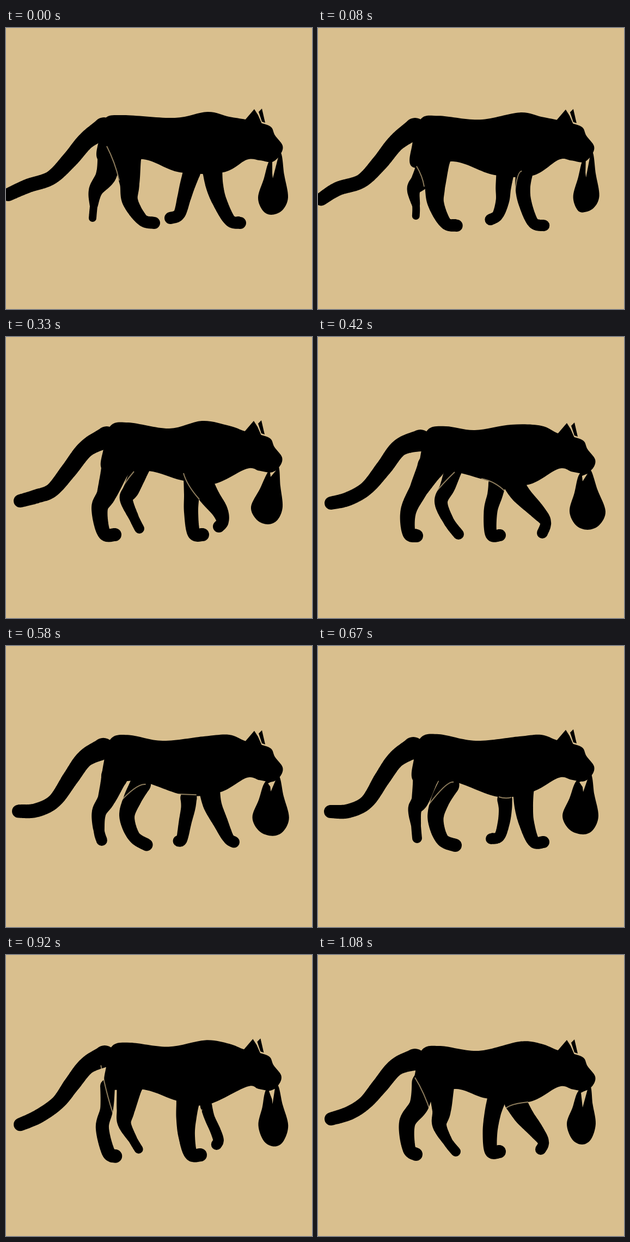
An HTML page with a canvas for the animation above (1.16 s loop, 562 by 516 pixels).

```html
<!DOCTYPE html>
<html>
<head>
<meta charset="utf-8">
<style>
  html, body { margin: 0; overflow: hidden; background: #d9bf8e; }
  canvas { display: block; }
</style>
</head>
<body>
<canvas id="stage" width="562" height="516"></canvas>
<script>
const LOOP = 1160;
const STEPS = [0, 80, 170, 250, 330, 420, 500, 580, 670, 750, 830, 920, 1000, 1080];
const KEYS = [0, 170, 330, 420, 670, 830, 1080];
const INK = '#000', SAND = '#d9bf8e', SEAM = 'rgba(217,191,142,.65)';

// One row per key pose.
const parse = text => text.trim().split('\n').map(row => row.match(/-?\d+/g).map(Number));

// Legs: hip, knee, hock, ankle, toe, then thigh and paw radius.
const nearHind = parse(`
222,235 227,285 228,318 250,352 272,358 18 11
208,245 200,295 200,325 211,362 229,368 19 11
202,238 185,288 172,315 180,360 200,363 18 12
208,238 185,280 166,320 167,360 181,365 17 12
198,240 188,282 178,300 180,330 182,353 16 9
224,240 213,285 211,308 226,338 234,354 16 8
226,235 227,285 223,312 238,342 253,361 17 9`);

const farHind = parse(`
190,232 184,270 165,298 161,328 159,349 19 7
228,236 200,285 191,296 205,330 210,345 16 8
247,240 230,280 221,298 235,332 245,352 15 9
248,245 238,275 226,303 240,338 258,362 14 10
240,255 224,285 216,318 228,355 252,366 17 12
190,245 189,285 187,320 201,362 214,369 10 12
193,235 186,275 164,308 167,355 180,366 18 12`);

const nearFore = parse(`
341,265 333,290 327,312 318,342 302,349 14 11
345,270 349,295 354,325 349,347 344,356 15 10
355,258 372,290 392,318 398,338 391,348 19 11
357,263 372,288 403,320 418,340 412,360 18 10
377,265 378,295 383,325 396,359 414,360 17 11
343,268 342,300 345,330 355,365 371,368 20 12
328,265 321,290 316,325 318,360 333,361 15 12`);

const farFore = parse(`
379,262 383,290 392,318 411,353 430,358 16 11
372,270 365,295 366,325 375,360 391,367 12 10
342,260 341,290 340,322 345,360 361,363 14 12
329,270 325,290 317,320 318,362 334,364 14 11
343,282 344,300 341,325 333,350 318,354 12 10
368,280 369,300 372,322 373,340 371,345 6 10
363,270 378,295 400,322 414,343 409,357 18 10`);

const tail = parse(`
4,306 40,290 83,275 118,241 147,207 180,184
13,320 38,300 78,286 108,254 140,213 177,187
26,301 55,293 85,281 116,244 147,205 185,184
24,305 56,297 90,277 121,240 150,203 188,190
23,304 56,303 90,286 118,243 143,208 175,187
25,315 58,300 98,273 124,237 150,203 182,183
24,301 58,290 87,271 113,241 143,206 178,192`);
const TAIL_RADII = [12, 13, 13, 15, 16, 20];

// Rump, croup, dip, shoulder, chest, belly, flank.
const torso = parse(`
171,203 215,160 310,165 370,154 399,265 319,265 252,241
177,225 230,163 283,173 370,157 385,278 325,273 250,250
179,205 225,157 300,168 360,154 381,270 322,263 262,246
190,207 235,164 288,171 355,161 387,271 325,267 252,248
176,208 222,162 290,174 370,166 393,268 331,277 245,248
185,198 228,158 300,165 365,156 366,276 320,271 256,248
179,213 225,167 295,176 370,159 386,270 308,263 254,246`);

const headShift = parse(`
0,0
-2,3
-1,5
1,9
-1,5
-4,4
1,7`);
const FACE = [[440, 168], [470, 175], [487, 182], [494, 197], [508, 216], [504, 232]];
const JAW = [[489, 246], [466, 243]];
const NEAR_EAR = [[438, 170], [456, 149], [463, 160], [470, 176]];
const FAR_EAR = [[464, 154], [470, 148], [476, 174], [470, 172]];

// Strap ends, slit tip, lowest point, then left, right and widest height.
const bag = parse(`
484,243 504,228 490,276 487,343 463 518 311
488,241 502,228 493,272 483,336 471 513 306
483,245 500,236 486,257 481,344 450 508 312
480,252 499,242 486,265 495,354 462 528 320
475,247 500,233 487,268 487,346 449 515 312
478,245 498,235 491,270 496,352 465 522 314
478,250 499,238 486,280 485,348 457 510 310`);

// Light seams: start, control, end.
const hindSeam = parse(`
185,217 200,246 208,280
182,289 186,297 184,304
235,247 215,270 206,292
251,248 230,268 212,290
249,250 238,246 202,293
182,198 188,265 201,315
178,225 195,252 208,292`);

const foreSeam = parse(`
361,266 361,266 361,266
378,262 364,262 366,332
326,250 332,272 355,298
300,260 325,265 343,283
332,277 344,281 355,278
367,278 360,310 362,338
339,290 342,274 386,270`);

const ctx = document.getElementById('stage').getContext('2d');
const count = KEYS.length;
const keyTime = i => KEYS[(i + count) % count] + LOOP * Math.floor(i / count);
const mix = (a, b, u) => a + (b - a) * u;
const shift = (points, dx, dy) => points.map(([x, y]) => [x + dx, y + dy]);

// Cyclic cubic interpolation between key poses.
function valuesAt(rows, time) {
  const i = KEYS.findLastIndex(k => k <= time);
  const [t0, t1, t2, t3] = [-1, 0, 1, 2].map(d => keyTime(i + d));
  const [a, b, c, d] = [-1, 0, 1, 2].map(n => rows[(i + n + count) % count]);
  const span = t2 - t1, u = (time - t1) / span;
  return b.map((v, n) => {
    const m1 = (c[n] - a[n]) / (t2 - t0) * span;
    const m2 = (d[n] - v) / (t3 - t1) * span;
    return mix(v, c[n], u * u * (3 - 2 * u)) + m1 * u * (1 - u) ** 2 - m2 * u * u * (1 - u);
  });
}

function toPoints(values) {
  const points = [];
  for (let n = 0; n + 1 < values.length; n += 2) points.push([values[n], values[n + 1]]);
  return points;
}

function fill(color) {
  ctx.fillStyle = color;
  ctx.fill();
}

function fillPolygon(points, color) {
  ctx.beginPath();
  points.forEach(p => ctx.lineTo(...p));
  fill(color);
}

function fillSmooth(points) {
  const n = points.length, at = i => points[(i + n) % n];
  const handle = (i, s) => [0, 1].map(k => at(i)[k] + s * (at(i + 1)[k] - at(i - 1)[k]) / 6);
  ctx.beginPath();
  ctx.moveTo(...at(0));
  for (let i = 0; i < n; i++)
    ctx.bezierCurveTo(...handle(i, 1), ...handle(i + 1, -1), ...at(i + 1));
  fill(INK);
}

// Round brush of varying radius along a smooth path.
function brush(points, radii) {
  const at = i => points[Math.max(0, Math.min(points.length - 1, i))];
  ctx.beginPath();
  for (let i = 0; i < points.length - 1; i++) {
    for (let u = 0; u <= 1; u += 1 / 32) {
      const [x, y] = [0, 1].map(k => {
        const [a, b, c, d] = [-1, 0, 1, 2].map(n => at(i + n)[k]);
        return b + u / 2 * (c - a + u * (2 * a - 5 * b + 4 * c - d + u * (3 * (b - c) + d - a)));
      });
      const r = mix(radii[i], radii[i + 1], u);
      ctx.moveTo(x + r, y);
      ctx.arc(x, y, r, 0, 2 * Math.PI);
    }
  }
  fill(INK);
}

function drawLeg(values, hipScale = 1.15) {
  const [thigh, paw] = values.slice(-2);
  brush(toPoints(values.slice(0, -2)), [thigh * hipScale, thigh, (thigh + paw) / 2, paw, paw]);
}

function drawBag(values) {
  const [strapL, strapR, slit, low] = toPoints(values.slice(0, 8));
  const [left, right, wide] = values.slice(8);
  const upper = ([x, y], side) => [mix(x, side, .5), mix(y, wide, .5)];
  const lower = side => [mix(side, low[0], .35), mix(wide, low[1], .75)];
  fillSmooth([strapL, upper(strapL, left), [left, wide], lower(left), low,
    lower(right), [right, wide], upper(strapR, right), strapR]);
  fillPolygon([[strapL[0] + 5, strapL[1] + 3], [slit[0] - 1, slit[1] - 9], slit,
    [strapR[0] - 4, strapR[1] + 9]], SAND);
}

function drawBody(values, [dx, dy]) {
  const [rump, croup, dip, shoulder, chest, belly, flank] = toPoints(values);
  fillSmooth([rump, [croup[0] - 33, croup[1] + 6], croup, dip, shoulder, [410, 163],
    ...shift(FACE, dx, dy), ...shift(JAW, dx, dy / 2), [442, 242],
    chest, belly, flank, [rump[0] + 2, rump[1] + 42]]);
  [NEAR_EAR, FAR_EAR].forEach(ear => fillPolygon(shift(ear, dx, dy), INK));
}

function drawSeam(values) {
  ctx.beginPath();
  ctx.moveTo(values[0], values[1]);
  ctx.quadraticCurveTo(...values.slice(2));
  ctx.strokeStyle = SEAM;
  ctx.lineWidth = 2;
  ctx.stroke();
}

function draw() {
  const now = performance.now() % LOOP;
  const time = STEPS.findLast(s => s <= now);
  const pose = rows => valuesAt(rows, time);
  ctx.fillStyle = SAND;
  ctx.fillRect(0, 0, 562, 516);
  drawBag(pose(bag));
  brush(toPoints(pose(tail)), TAIL_RADII);
  [farHind, farFore, nearFore].forEach(leg => drawLeg(pose(leg)));
  drawLeg(pose(nearHind), 1.5);
  drawBody(pose(torso), pose(headShift));
  [hindSeam, foreSeam].forEach(seam => drawSeam(pose(seam)));
  requestAnimationFrame(draw);
}
draw();
</script>
</body>
</html>
```
